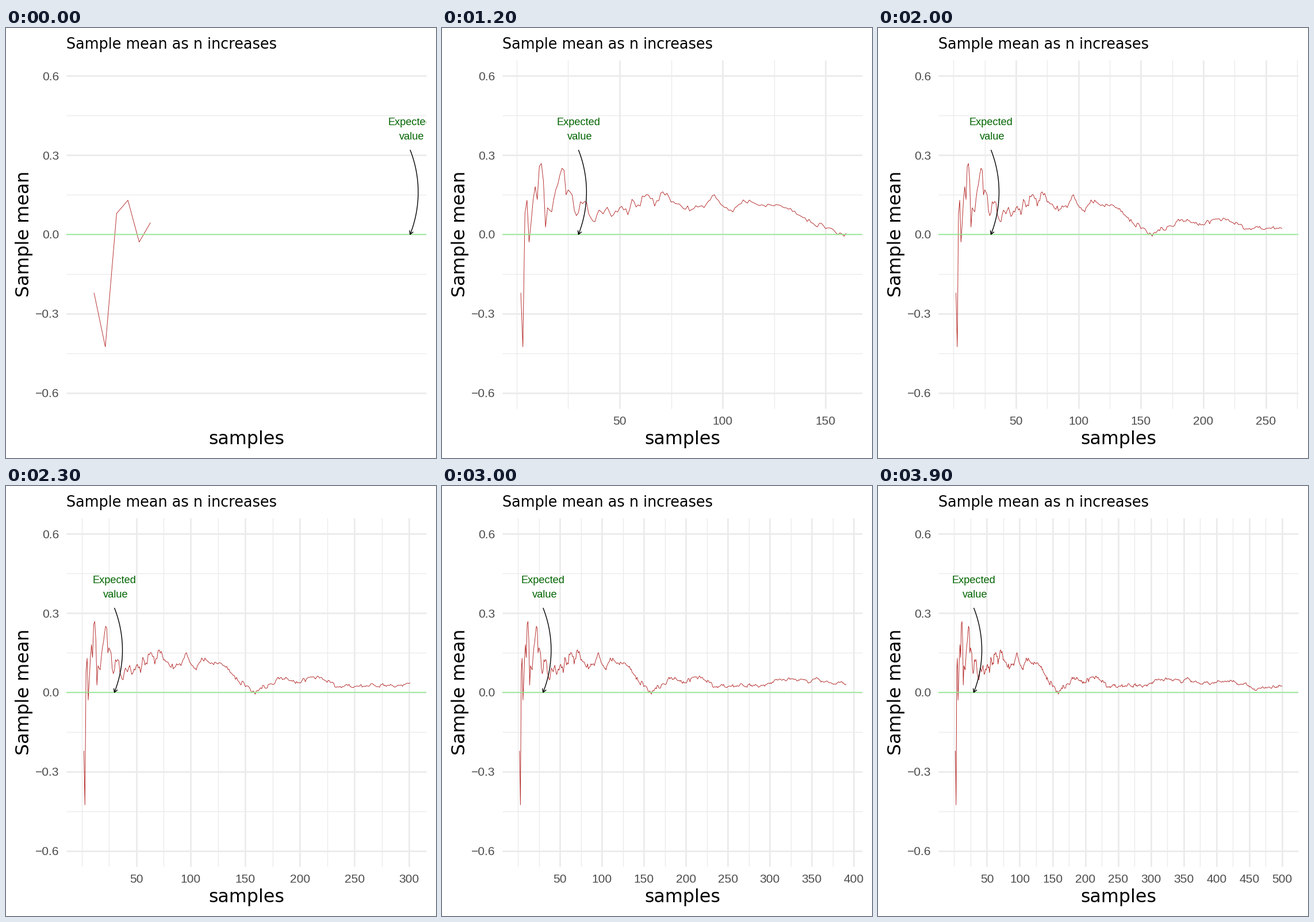
Animation, 748 px wide and 748 px high, one loop 5 s. Source, as a matplotlib script:

```python
from math import erf, sqrt

import numpy as np
import matplotlib.pyplot as plt
from matplotlib.animation import FuncAnimation
from matplotlib.patches import Rectangle

SIZE, DPI = 748, 68
PX = 72 / DPI  # points per pixel
LEFT, RIGHT, TOP, BOTTOM = 105, 731.5, 56, 661.5
X_FIRST, X_LAST = 133.5, 703  # pixel range of the samples axis
GREY, TICK = "#ebebeb", "#4d4d4d"
SAMPLES, MOVING, FRAMES = 500, 39, 50


def normal_samples(count, seed=1):
    """Mersenne Twister filled by a congruential generator, then inversion."""
    words = []
    for _ in range(675):
        seed = (69069 * seed + 1) % 2**32
        words.append(seed)
    rng = np.random.RandomState()
    rng.set_state(("MT19937", np.array(words[-624:], dtype=np.uint32), 624))
    z = np.linspace(-5, 5, 4001)
    cdf = [0.5 + 0.5 * erf(v / sqrt(2)) for v in z]
    return np.interp(rng.random_sample(count), cdf, z)


n = np.arange(1, SAMPLES + 1)
mean = np.cumsum(normal_samples(SAMPLES)) / n


def y_px(value):
    return 359 - 459.2 * value


fig = plt.figure(figsize=(SIZE / DPI, SIZE / DPI), dpi=DPI, facecolor="white")
ax = fig.add_axes([0, 0, 1, 1])
ax.set(xlim=(0, SIZE), ylim=(SIZE, 0))
ax.axis("off")
panel = Rectangle((LEFT, TOP), RIGHT - LEFT, BOTTOM - TOP,
                  transform=ax.transData)


def stroke(x, y, color, width, z):
    return ax.plot(x, y, color=color, lw=width * PX, zorder=z,
                   solid_capstyle="butt")[0]


def label(x, y, text, size, color="black", font="DejaVu Sans", **kw):
    return ax.text(x, y, text, fontsize=size * PX, color=color, family=font,
                   va="baseline", zorder=6, **kw)


def tick_label(x, y, text, ha):
    return label(x, y, text, 21, TICK, "Liberation Sans", ha=ha)


# Fixed parts
for k in range(-4, 5):
    y = y_px(0.15 * k)
    major = k % 2 == 0
    stroke([LEFT, RIGHT], [y, y], GREY, 2.8 if major else 1.4, 1 + major)
    if major:
        text = f"{0.15 * k:.1f}".replace("-", "\u2212")
        tick_label(92, y + 7.3, text, "right")
stroke([LEFT, RIGHT], [359, 359], "#90ee90", 1.6, 4)
label(105, 36, "Sample mean as n increases", 25.5)
label(418.3, 724, "samples", 31.8, ha="center")
label(40, 358.5, "Sample mean", 31.8, ha="center",
      rotation=90, rotation_mode="anchor")

# Moving parts
grid = {}
for value in range(0, SAMPLES + 1, 25):
    major = value > 0 and value % 50 == 0
    line = stroke([0, 0], [TOP, BOTTOM], GREY, 2.8 if major else 1.4,
                  1 + major)
    text = tick_label(0, 690, str(value), "center") if major else None
    grid[value] = line, text

curve = stroke([], [], "#b22222", 0.9, 3)
arrow = stroke([], [], "black", 1.4, 5)
note = [label(0, y, text, 18.2, "#006400", "Liberation Sans",
              ha="center", clip_on=True)
        for y, text in ((169, "Expected"), (194, "value"))]
for part in note:
    part.set_clip_path(panel)

# Arrow: a circular arc followed by its open head
RADIUS = 200
half = np.arcsin(73.5 / RADIUS)
sweep = np.linspace(-half, half, 30)
arc_x = RADIUS * (np.cos(sweep) - np.cos(half))
arc_y = 285.5 + RADIUS * np.sin(sweep)
barbs = half + np.radians([-30, 30])
barb_x, barb_y = 7 * np.sin(barbs), 359 - 7 * np.cos(barbs)
arrow_x = np.r_[arc_x, np.nan, barb_x[0], 0, barb_x[1]]
arrow_y = np.r_[arc_y, np.nan, barb_y[0], 359, barb_y[1]]


def draw(frame):
    shown = min(SAMPLES, round(6.8 + (SAMPLES - 1) / MOVING * frame))
    last = max(30, shown)
    scale = (X_LAST - X_FIRST) / (last - 1)

    def x_px(value):
        return X_FIRST + (value - 1) * scale

    upper = last + 0.05 * (last - 1)
    for value, (line, text) in grid.items():
        # Minor lines need at least two major ones.
        visible = value <= upper and (text is not None or upper >= 100)
        line.set_visible(visible)
        line.set_xdata([x_px(value)] * 2)
        if text:
            text.set_visible(visible)
            text.set_x(x_px(value))

    # The curve starts at the second sample.
    curve.set_data(x_px(n[1:shown]), y_px(mean[1:shown]))
    anchor = x_px(30)
    arrow.set_data(anchor + arrow_x, arrow_y)
    note[0].set_x(anchor - 0.4)
    note[1].set_x(anchor + 2.6)
    return []


anim = FuncAnimation(fig, draw, frames=FRAMES, interval=100, repeat=True,
                     repeat_delay=0, blit=False)
plt.show()
```
